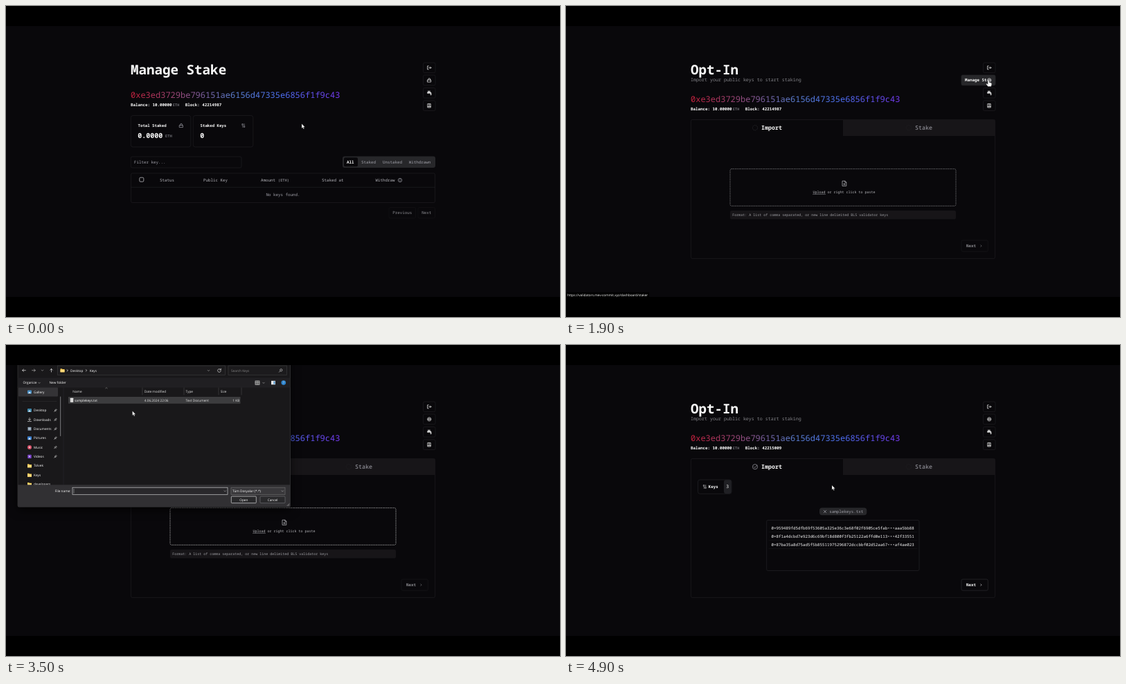
Write an HTML page that moves like this. It is 800 px wide and 450 px high and loops after 5000 ms.

```html
<!DOCTYPE html>
<html lang="en">
<head>
<meta charset="utf-8">
<title>Staking dashboard</title>
<style>
html, body { margin: 0; width: 100%; height: 100%; overflow: hidden; background: #000; }
svg { display: block; width: 100vw; height: 100vh; }
text { white-space: pre; text-rendering: geometricPrecision; font-family: 'Noto Sans Mono', monospace; }
text.ui { font-family: 'Open Sans', 'Noto Sans', sans-serif; }
.window { filter: drop-shadow(0 4px 7px rgba(0, 0, 0, .7)); }
</style>
</head>
<body>
<svg id="stage" viewBox="0 0 800 450"></svg>
<script>
const LOOP = 5000, STEP = 100;
const WHITE = '#fafafa', GRAY = '#a1a1aa', LINE = '#1f1e22', PANEL = '#171518';
const stage = document.getElementById('stage');

// Shape helpers; y of a text is the middle of its capitals.
const text = (x, y, s, size = 5.83, fill = WHITE, weight = 500, extra = '') =>
  `<text x="${x}" y="${y + size * .36}" font-size="${size}" fill="${fill}" font-weight="${weight}" ${extra}>${s}</text>`;
const ui = (x, y, s, fill = '#fff', extra = '') => text(x, y, s, 4.75, fill, 450, 'class="ui" ' + extra);
const rect = (x, y, x2, y2, fill = 'none', stroke = 'none', r = 0, extra = '') =>
  `<rect x="${x}" y="${y}" width="${x2 - x}" height="${y2 - y}" rx="${r}" fill="${fill}" stroke="${stroke}" stroke-width=".7" ${extra}/>`;
const path = (d, stroke = WHITE, w = .7, fill = 'none') =>
  `<path d="${d}" stroke="${stroke}" stroke-width="${w}" fill="${fill}" stroke-linecap="round" stroke-linejoin="round"/>`;
const dot = (x, y, r, fill, stroke = 'none', extra = '') =>
  `<circle cx="${x}" cy="${y}" r="${r}" fill="${fill}" stroke="${stroke}" stroke-width=".7" ${extra}/>`;
const group = (x, y, body) => `<g transform="translate(${x} ${y})">${body}</g>`;

// Piecewise linear value of rows [time, ...values].
function at(rows, t) {
  if (t <= rows[0][0]) return rows[0].slice(1);
  for (let i = 1; i < rows.length; i++) {
    const a = rows[i - 1], b = rows[i];
    if (t <= b[0]) return a.slice(1).map((v, k) => v + (b[k + 1] - v) * (t - a[0]) / (b[0] - a[0]));
  }
  return rows[rows.length - 1].slice(1);
}

const POINTER = [
  [500, 427, 170.5], [700, 442, 170.5], [1000, 521, 170], [1200, 580, 143], [1400, 610, 107],
  [2100, 610, 107], [2300, 520, 172], [2500, 416, 245], [2600, 402, 249.5], [2900, 402, 249.5],
  [3200, 354, 209], [3400, 215, 112], [3600, 150, 79], [3700, 150, 79], [3900, 272.8, 177.5],
  [4100, 342, 221], [4300, 343, 222], [4600, 372, 209], [4900, 384, 203]
];
const BUTTON_WIDTH = [[1300, 17.5], [1500, 49], [1900, 49], [2000, 64], [2100, 68], [2300, 17.5]];

const lock = c => path('M-2.4-.4h4.8v3h-4.8zM-1.4-.4v-1a1.4 1.4 0 0 1 2.8 0v1', c);
const target = dot(0, 0, 2.6, 'none', WHITE) + dot(0, 0, 1, 'none', WHITE) + path('M-2 0h1M1 0h1');
const logout = path('M-1-2.5h-1.6v5h1.6M-.8 0h3.4M1.4-1.3L2.7 0 1.4 1.3');
const faucet = path('M-2-2.5h3.2M-.4-2.5v1.6', WHITE, .8) + rect(-3, -1.2, 2.4, .6, WHITE, 'none', .5) + path('M2.4 0v2.8', WHITE, 1.2);
const book = path('M-2-2.7h4v5.4h-4zM-2 1.3h4M-.7-1.3h1.4M-.7 0h1.4');
const binary = c => path('M-1.8-2.4h1.2v1.8h-1.2zM1.2-2.4v1.8M-1.2 .6v1.8M.6 .6h1.2v1.8h-1.2z', c, .6);
const chevron = 'M-.6-1.2L.6 0-.6 1.2';

function sideButtons(t, optIn) {
  const w = at(BUTTON_WIDTH, t)[0], open = w > 18, x = 620 - w;
  let out = [[89.3, logout], [125.8, faucet], [144.2, book]].map(([y, icon]) =>
    rect(602.5, y - 7.3, 620, y + 7.3, 'none', LINE, 2) + group(611.2, y, icon)).join('');
  out += rect(x, 100, 620, 114.8, open ? '#27272a' : 'none', open ? '#27272a' : LINE, 2);
  if (open) out += `<clipPath id="label"><rect x="${x}" y="100" width="${w - 12}" height="15"/></clipPath>` +
    text(x + 5, 107.4, optIn ? 'Manage Stake' : 'Opt-In', 5.83, WHITE, 600, 'clip-path="url(#label)"');
  return out + group(611.2, 107.4, optIn ? target : lock(WHITE));
}

function account(y, t) {
  const late = t >= 2500;
  return text(180, y, '0xe3ed3729be796151ae6156d47335e6856f1f9c43', 12, 'url(#hue)') +
    text(180, y + 14.5, 'Balance: 10.00000', 5.83, WHITE, 600) + text(241, y + 14.8, 'ETH', 5.2, GRAY) +
    text(258.8, y + 14.5, 'Block:', 5.83, WHITE, 600) +
    text(283.2, y + 14.5, late ? 42215009 : 42214987, 5.83, late && t < 3000 ? '#f0525a' : WHITE, 600);
}

function managePage(t) {
  const card = (x, label, icon, value) => rect(x, 158.5, x + 86.5, 204, 'none', LINE, 3) +
    text(x + 10.3, 172.7, label, 5.7, WHITE, 600) + group(x + 72.7, 173, icon) +
    text(x + 10, 187.3, value, 10, WHITE, 700);
  const cells = [[222, 'Status'], [285, 'Public Key'], [368, 'Amount'], [456, 'Staked at'], [533.5, 'Withdraw']];
  const filters = [[513, 'Staked'], [544, 'Unstaked'], [581.8, 'Withdrawn']];
  return text(180, 91.8, 'Manage Stake', 19.2, WHITE, 700) + account(128.5, t) +
    card(180.3, 'Total Staked', lock(GRAY), '0.0000') + text(230, 188.3, 'ETH', 5.4, GRAY) +
    card(270.3, 'Staked Keys', binary(GRAY), '0') +
    rect(180.3, 218, 340, 234, 'none', LINE, 2) + text(185, 226, 'Filter key...', 5.83, GRAY) +
    rect(486, 217.5, 620, 234, '#27272a', 'none', 3) + rect(488, 219.3, 508, 232.3, '#09080b', 'none', 2) +
    text(492, 225.8, 'All', 5.83, WHITE, 600) +
    filters.map(([x, s]) => text(x, 225.8, s, 5.83, GRAY)).join('') +
    rect(180.5, 242, 619.5, 284.5, 'none', LINE, 2) + path('M180.5 262.3H619.5', LINE) +
    rect(192.8, 248.2, 198.8, 254.2, 'none', '#d4d4d8', 1.4) +
    cells.map(([x, s]) => text(x, 251.8, s, 5.83, '#b4b4ba')).join('') +
    text(393, 251.8, '(ETH)', 5.3, '#b4b4ba') +
    dot(569, 252, 2.7, 'none', GRAY) + path('M569 251.8v1.4M569 250.5v.1', GRAY) +
    text(375.5, 273, 'No keys found.', 5.83, GRAY) +
    rect(553, 291.5, 591.5, 307, 'none', '#131215', 2) + rect(595, 291.5, 619.5, 307, 'none', '#131215', 2) +
    text(558.3, 299.2, 'Previous', 5.83, '#8b8b90') + text(600.3, 299.2, 'Next', 5.83, '#8b8b90');
}

function dropZone(t) {
  const c = t >= 2500 ? '#d0d0d0' : '#929296';
  return rect(237, 235.7, 563, 289.3, 'none', c, 2, 'stroke-dasharray="1.5 1"') +
    group(402, 256.8, path('M-2.6-3.6h3.4l2 2v5.2h-5.4zM.8-3.6v2h2M0-.2v2.4M-1.2 1h2.4', '#c0c0c4')) +
    text(356.5, 269, 'Upload or right click to paste', 5, '#b8b8bc') + path('M356.5 272.3h18', '#b8b8bc', .5) +
    rect(237, 296, 563, 308.5, PANEL, 'none', 2) +
    text(240.3, 302.2, 'Format: A list of comma separated, or new line delimited BLS validator keys', 5, '#a0a0a5');
}

function keyList() {
  const keys = ['0×959489fd5dfb69f53605a325e36c3e68f02f6905ce5fab•••aaa5bb88',
    '0×8f1a4dcbd7e923d6c69bf18d800f3fb25122a6ffd0e113•••42f33551',
    '0×87ba35a8d75ad5f5b85511975296872dccbbf02d52aa67•••af4ae023'];
  return rect(190.5, 195, 239, 215.3, 'none', '#232327', 3) + rect(228, 195.3, 238.7, 215, '#202024', 'none', 3) +
    group(200.5, 205, binary('#c8c8cc')) + text(205.7, 205, 'Keys', 5.83, WHITE, 600) +
    text(231.3, 205, '3', 6.4) +
    rect(366, 235.5, 434.3, 246.2, '#27272a', 'none', 4) + path('M372.2 239.2l3.6 3.6M375.8 239.2l-3.6 3.6', GRAY) +
    text(380.3, 240.8, 'samplekeys.txt', 5.83, GRAY) +
    rect(289.7, 253.5, 510, 326.5, 'none', '#232327', 2) +
    keys.map((k, i) => text(296.5, 264.5 + 12 * i, k) + path(`M293 ${270.6 + 12 * i}H507`, '#19191c', .6)).join('');
}

function optInPage(t) {
  const ready = at([[4600, 0], [4900, 1]], t)[0], checked = t >= 4800;
  const next = (opacity, color, border) => `<g opacity="${opacity}">` + rect(571, 339, 609.3, 355.2, 'none', border, 2) +
    text(578, 347, 'Next', 5.83, color, 600) + group(599.5, 347.2, path(chevron, color, .6)) + '</g>';
  return text(180, 91.8, 'Opt-In', 19.2, WHITE, 700) +
    text(180, 106.4, 'Import your public keys to start staking', 6.67, '#85858a', 400) + account(134.5, t) +
    rect(180.4, 164.5, 619.6, 365.4, 'none', LINE, 2) + rect(400, 164.8, 619.4, 188, PANEL) +
    dot(273, 176.2, 3.6, 'none', checked ? GRAY : '#36363a', checked ? '' : 'stroke-dasharray="1.3 .9"') +
    (checked ? path('M271.3 176.2l1.4 1.4 3-3.4', GRAY) : '') +
    text(282, 176.2, 'Import', 8.33, WHITE, 600) +
    dot(495, 176.2, 3.6, 'none', '#242428', 'stroke-dasharray="1.3 .9"') + text(504, 176.2, 'Stake', 8.33, GRAY) +
    (t < 4600 ? dropZone(t) : keyList()) + next(1 - ready, '#8b8b90', '#17171a') + next(ready, WHITE, '#2b2b30');
}

const folder = path('M-3-2.4h2.2l.8 .8h3v4.2h-6z', 'none', 0, '#f3c64e') + path('M-3-.9h6v3.5h-6z', 'none', 0, '#ffd978');
const picture = c => rect(-3, -2.5, 3, 2.5, c, 'none', .8) + path('M-2 2L0-.6 2 2z', 'none', 0, '#e8f3fc');
const page = rect(-2.2, -3, 2.2, 3, '#eee', 'none', .4) + path('M-1.2-1h2.4M-1.2 .2h2.4M-1.2 1.4h2.4', '#999', .4);
const PLACES = [['Desktop', picture('#3f87a8')], ['Downloads', path('M0-2.6V1M-1.6-.6L0 1 1.6-.6M-2.5 2.6h5', '#ddd')],
  ['Documents', rect(-2.5, -2.5, 2.5, 2.5, '#8297ac', 'none', .5) + path('M-1.4-1h2.8M-1.4 .6h2.8', '#eee', .5)],
  ['Pictures', picture('#3b7fd0')], ['Music', dot(0, 0, 3, '#d9536b') + dot(0, 0, 1, '#fbe4e8')],
  ['Videos', rect(-2.7, -2.7, 2.7, 2.7, '#7d45cf', 'none', .8) + path('M-.8-1.2L1.2 0-.8 1.2z', 'none', 0, '#fff')],
  ['Tolvek', folder], ['Keys', folder], ['developers', folder]];
const caret = (x, y) => path(`M${x - 1.3} ${y - .6}l1.3 1.3 1.3-1.3`, '#ccc', .5);

function fileDialog(t) {
  const picked = t >= 3700, settled = t >= 3300;
  const button = (x, s, c) => rect(x, 219, x + 36, 228.7, '#29292b', c, 1) + ui(x + 18, 223.8, s, WHITE, 'text-anchor="middle"');
  const places = PLACES.map(([name, icon], i) => {
    const y = 94.6 + 13.35 * i;
    return group(34, y, icon) + ui(40, y, name) +
      (i < 6 ? group(71.5, y, path('M-1.8 1.8L-.5 .5M-1.2-.4L.4 1.2M-.6-.4L.8-1.8 1.8-.8.4 .6', '#bbb', .8)) : '');
  }).join('');
  const nav = path('M28.3 36.7h-4.6M25.5 35l-1.8 1.7 1.8 1.7M65.5 39v-4.6M63.8 36.2l1.7-1.8 1.7 1.8', '#e8e8e8') +
    path('M37.7 36.7h4.6M40.5 35l1.8 1.7-1.8 1.7', '#b0b0b0') + caret(52.5, 36.7) +
    rect(74.5, 30, 316.5, 43.3, '#1c1b1d', '#39393b') + group(81.5, 36.7, folder) +
    group(88.7, 36.8, path(chevron)) + ui(93, 36.8, 'Desktop') +
    group(116, 36.8, path(chevron)) + ui(120.8, 36.8, 'Keys') + caret(292.5, 37) +
    path('M310 35.6a2.4 2.4 0 1 0 .4 1.8M310.4 34.2v1.8h-1.8', '#ddd') +
    rect(321, 30, 405.5, 43.3, '#1c1b1d', '#39393b') + ui(325, 36.8, 'Search Keys', '#858585') +
    dot(397.3, 36.3, 1.6, 'none', '#ccc') + path('M396 37.6l-1.6 1.6', '#ccc');
  const tools = rect(17.3, 47.5, 410.2, 61, '#201f22') +
    (settled ? ui(24.5, 54.6, 'Organize') + caret(48, 54.8) + ui(62.5, 54.6, 'New folder') +
      rect(360, 52, 366, 57.3, '#555', '#ccc') + path('M360 54.6h6M363 52v5.3', '#ccc', .5) + caret(372, 54.8) : '') +
    rect(383, 51.8, 389, 57.3, '#e8e8e8') + rect(386.5, 52.5, 388.4, 56.6, '#3d88c4') +
    dot(400.8, 54.6, 3.3, '#2f86cf') + ui(400.8, 54.7, '?', '#fff', 'text-anchor="middle"');
  const columns = [[96.3, 'Name'], [199.7, 'Date modified'], [259.5, 'Type'], [309.7, 'Size']];
  const file = rect(90, 75, 338.5, 84.8, picked ? '#777779' : t >= 3500 ? '#3c3c3e' : 'none', picked ? '#98989a' : 'none') +
    group(95, 79.8, page) + ui(99, 79.9, 'samplekeys.txt') + ui(199.7, 79.9, '4.06.2024 22:06', '#e4e4e4') +
    ui(259.5, 79.9, 'Text Document', '#e4e4e4') + ui(337.3, 79.9, '1 KB', '#e4e4e4', 'text-anchor="end"');
  const footer = rect(17, 202.3, 410.5, 234.2, '#313033') + ui(93.5, 211.4, 'File name:', '#fff', 'text-anchor="end"') +
    rect(96, 206.2, 320, 216.3, '#29282b', picked ? '#858587' : '#c8c8ca') +
    (picked ? ui(97.5, 211.4, 'samplekeys.txt') : path('M98 208.4v5.8', '#ddd', .4)) + caret(316.3, 211.4) +
    rect(325, 206.2, 403, 216.3, '#39383b', '#6a6a6c') + ui(327, 211.4, 'Tüm Dosyalar (*.*)') + caret(399.3, 211.4) +
    button(325.3, 'Open', '#d8d8da') + button(367, 'Cancel', '#6f6f71') +
    path('M406 232.6l3-3M407.6 232.6l1.4-1.4', '#aaa', .6);
  const [scale, alpha] = t < 3300 ? [.9637, 1] : at([[4200, 1, 1], [4400, .92, 0]], t);
  return `<g class="window" opacity="${alpha}" transform="translate(${185 * (1 - scale)} ${116 * (1 - scale)}) scale(${scale})">` +
    rect(17, 10, 410.5, 234.2, '#19181a', '#3a3a3c', 2) + nav + tools +
    path('M17 61H410', '#29292b', .5) + rect(18, 61.5, 75, 74.6, '#343336', 'none', 1) +
    group(34, 68, picture('#4a8fc4')) + ui(40, 68, 'Gallery') + path('M24 81.5H73', '#303032', .5) + places +
    path('M78.7 75V131.5', '#8a8a8c', .9) + path('M83 61.5V202', '#2b2b2d', .6) +
    columns.map(([x, s]) => ui(x, 66.9, s, '#e4e4e4')).join('') +
    path('M197 62v10M257 62v10M307 62v10M340 62v10', '#4a4a4c', .6) + path('M143.7 62.8l1.3-1.2 1.3 1.2', '#aaa', .5) +
    file + footer + '</g>';
}

function pointer(t) {
  const [x, y] = at(POINTER, t), hand = (t >= 1400 && t <= 2100) || (t >= 2500 && t < 3100);
  return group(x, y, hand
    ? path('M-.9 .8Q0-.4 .9 .8V3.4L3.8 4.2Q5 4.6 4.8 6L4 9.4H-.7L-3.2 6.2Q-3.5 5-2.2 5.2L-.9 6.2z', '#222', .35, '#fff')
    : path('M0 0V6.4L1.5 5.1 2.5 7.4 3.6 6.9 2.6 4.7H4.6z', '#222', .3, '#fff'));
}

function scene(t) {
  const optIn = t >= 1800, status = t >= 1400 && t < 2400;
  return `<defs><linearGradient id="hue" gradientUnits="userSpaceOnUse" x1="180" x2="482">` +
    [[0, '#c41e3a'], [.28, '#8c5289'], [.5, '#5a80d4'], [.72, '#4b6ef0'], [1, '#7438f0']]
      .map(([o, c]) => `<stop offset="${o}" stop-color="${c}"/>`).join('') + '</linearGradient></defs>' +
    rect(0, 0, 800, 450, '#000') + rect(0, 29, 800, 421, '#09080b') +
    (optIn ? optInPage(t) : managePage(t)) + sideButtons(t, optIn) +
    (status ? rect(0, 414.3, 120, 421, '#000') + ui(2, 417.9,
      'https://validators.mev-commit.xyz/dashboard/' + (optIn ? 'staker' : 'opt-in')) : '') +
    (t >= 3200 && t < 4400 ? fileDialog(t) : '') + rect(0, 0, 800, 29, '#000') + pointer(t);
}

let shown = -1;
function tick(now) {
  const t = Math.floor(now % LOOP / STEP) * STEP;
  if (t !== shown) stage.innerHTML = scene(shown = t);
  requestAnimationFrame(tick);
}
tick(performance.now());
</script>
</body>
</html>
```
